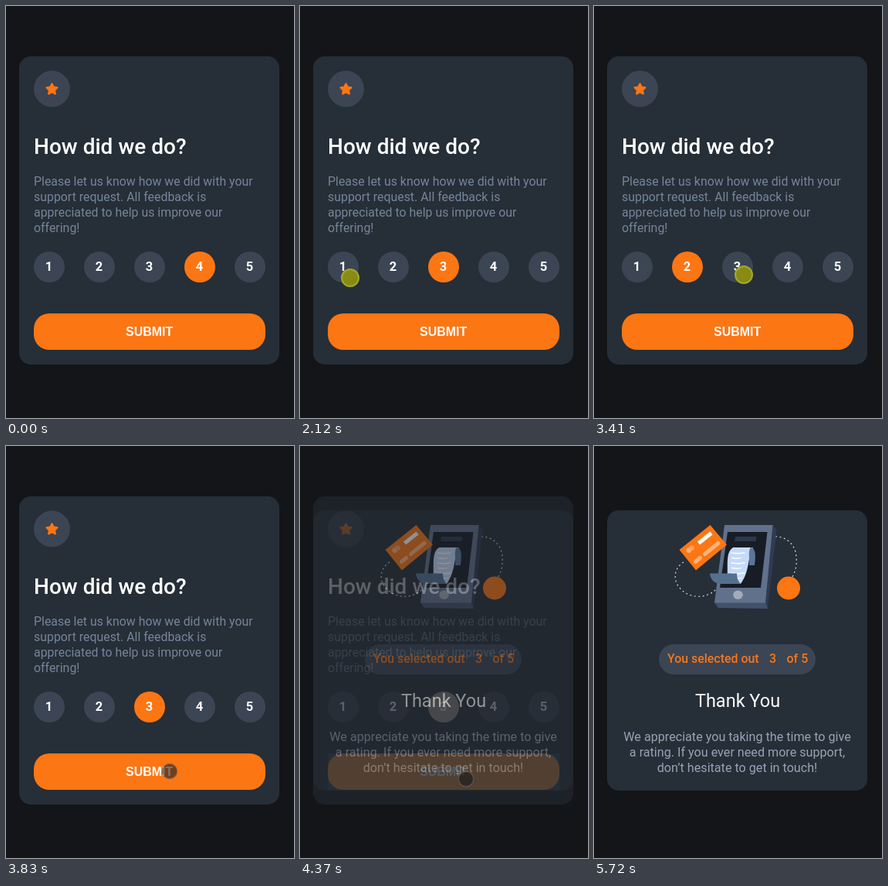
Recreate the animation shown at these times as an HTML page with a canvas. Size 373x532 px, loop 6.66 s.

```html
<!DOCTYPE html>
<html lang="en">
<head>
<meta charset="utf-8">
<title>Rating card</title>
<style>
  html, body { margin: 0; width: 100%; height: 100%; overflow: hidden; background: #131518; }
  canvas { display: block; width: 373px; height: 532px; }
</style>
</head>
<body>
<canvas id="stage" width="373" height="532"></canvas>
<script>
const W = 373, H = 532, LOOP = 6660, STEP = 69;
const BG = '#131518', CARD = '#262e37', SLATE = '#3b4554', ORANGE = '#fc7614';
const SANS = 'Roboto, "Open Sans", sans-serif';
const screen = document.getElementById('stage').getContext('2d');

const layer = () => {
  const c = document.createElement('canvas');
  c.width = W;
  c.height = H;
  return c.getContext('2d');
};
const form = layer(), thanks = layer();

const clamp = v => Math.max(0, Math.min(1, v));
const easeOut = u => 1 - (1 - u) * (1 - u);
const easeBoth = u => u * u * (3 - 2 * u);

function box(g, x, y, w, h, r, color) {
  g.fillStyle = color;
  g.beginPath();
  g.roundRect(x, y, w, h, r);
  g.fill();
}

function disc(g, x, y, r, color, ry = r) {
  g.fillStyle = color;
  g.beginPath();
  g.ellipse(x, y, r, ry, 0, 0, Math.PI * 2);
  g.fill();
}

function shape(g, color, d) {
  g.fillStyle = color;
  g.fill(new Path2D(d));
}

function line(g, color, width, d, cap = 'round') {
  g.strokeStyle = color;
  g.lineWidth = width;
  g.lineCap = cap;
  g.stroke(new Path2D(d));
}

function text(g, str, x, y, font, color, align = 'left') {
  g.font = font;
  g.fillStyle = color;
  g.textAlign = align;
  g.fillText(str, x, y);
}

function star(g, x, y, r) {
  g.beginPath();
  for (let i = 0; i < 10; i++) {
    const a = -Math.PI / 2 + i * Math.PI / 5, d = i % 2 ? r * 0.52 : r;
    g.lineTo(x + d * Math.cos(a), y + d * Math.sin(a));
  }
  g.closePath();
  g.fillStyle = g.strokeStyle = ORANGE;
  g.lineJoin = 'round';
  g.lineWidth = 2;
  g.fill();
  g.stroke();
}

const buttonX = n => 56 + 65 * (n - 1);

function drawForm(g, rating, active) {
  g.clearRect(0, 0, W, H);
  box(g, 17, 65, 337, 398, 15, CARD);
  disc(g, 59.5, 107, 23.5, SLATE);
  star(g, 59.5, 107.6, 7.4);
  text(g, 'How did we do?', 36, 191, `500 28px ${SANS}`, '#fff');
  ['Please let us know how we did with your', 'support request. All feedback is',
    'appreciated to help us improve our', 'offering!']
    .forEach((s, i) => text(g, s, 36, 231.5 + 20 * i, `15.9px ${SANS}`, '#75859a'));
  for (let n = 1; n <= 5; n++) {
    disc(g, buttonX(n), 337, 20, n === rating ? active : SLATE);
    text(g, n, buttonX(n) - 0.5, 341.5, `bold 16.5px ${SANS}`, '#fff', 'center');
  }
  box(g, 36, 397, 300, 47, 20, ORANGE);
  text(g, 'SUBMIT', 155, 426, 'bold 16px "Liberation Sans", Arial, sans-serif', '#fff');
}

function drawPicture(g) {
  g.setLineDash([2, 3.5]);
  line(g, '#e4e8ee', 1.1, 'M116 150C104 157 102 172 110 182C122 198 147 198 159 184', 'butt');
  line(g, '#e4e8ee', 1.1, 'M235 117C250 117 261 128 262 143C263 154 261 161 257 169', 'butt');
  g.setLineDash([]);

  // phone
  shape(g, '#2f3b51', 'M231 102L236.5 108L225 210L161 209L156 202Z');
  shape(g, '#42506a', 'M156 202L161 209L225 210L222 202Z');
  shape(g, '#61718c', 'M169 102H231.5L222 202.5H156Z');
  shape(g, '#171c25', 'M173 111H224.5L216 183H163Z');
  shape(g, '#2d384c', 'M183 117H210.5L209.5 123H182Z');
  disc(g, 186.5, 192.3, 6.3, '#a3abb8', 5.7);

  // receipt
  shape(g, '#c5dafa', 'M180 131H206C199 139 203 160 190 178H171C176 161 168 139 180 131Z');
  shape(g, '#5b7698', 'M203 131C211 132 209 146 208 154H201C202 145 199 136 203 131Z');
  for (let i = 0; i < 6; i++) {
    const y = 138 + i * 6.5;
    line(g, '#fff', 1.3, `M${178 + i % 2} ${y}q8 1.5 ${i % 2 ? 12 : 17} 0`);
  }
  shape(g, '#55708f', 'M150 164.5H185C185 171 187 175 190 178H163C155 177 151 172 150 164.5Z');

  // payment card
  shape(g, ORANGE, 'M110.5 134L150.5 102L172 127.5L132 160.5Z');
  line(g, '#fff', 5, 'M135.5 125.5L152 112.5', 'butt');
  line(g, '#ffb27a', 5, 'M143.5 139.5L161 125.5');
  line(g, '#ffb27a', 5, 'M131.5 149.5L137.5 144.5');
  disc(g, 122.8, 134.7, 3.3, '#ffb27a');
  disc(g, 126.6, 131.8, 3.3, '#ffa05c');

  disc(g, 252, 183.5, 15, ORANGE);
}

function drawThanks(g) {
  box(g, 17, 83, 337, 362, 15, CARD);
  drawPicture(g);
  box(g, 84, 256, 203, 39, 19.5, SLATE);
  const font = `500 15.9px ${SANS}`;
  text(g, 'You selected out', 95, 280, font, ORANGE);
  text(g, '3', 231.5, 280, font, ORANGE, 'center');
  text(g, 'of 5', 249.5, 280, font, ORANGE);
  text(g, 'Thank You', 186, 337, `23.5px ${SANS}`, '#fff', 'center');
  ['We appreciate you taking the time to give', 'a rating. If you ever need more support,',
    'don’t hesitate to get in touch!']
    .forEach((s, i) => text(g, s, 185.5, 380.5 + 20 * i, `16.15px ${SANS}`, '#97a3b5', 'center'));
}

// [start, steps, from x, y, to x, y, easing]
const moves = [
  [680, 9, 339, 528, 189, 341, easeOut],
  [1440, 8, 189, 341, 66, 351, easeBoth],
  [2120, 1, 65, 351, 65, 351, easeBoth],
  [2320, 5, 65, 351, 142, 347, easeBoth],
  [2990, 6, 142, 347, 194, 347, easeBoth],
  [3550, 4, 194, 347, 212, 420, easeBoth],
  [3830, 3, 212, 420, 215, 430, easeOut],
  [5310, 5, 220, 434, 329, 526, u => u]
];
const ratings = [[0, 4], [1440, 3], [2320, 1], [2990, 2], [3550, 3]];
const presses = [[1300, 1370], [2120, 2250], [2790, 2920], [3410, 3480], [4100, 4230]];
const taps = [[1370, 3], [2250, 1], [2920, 2], [3480, 3]];

const latest = (list, t) => list.filter(item => item[0] <= t).pop();

function drawPointer(g, t) {
  if (t < 680 || t >= 5715 || (t >= 1160 && t < 1230)) return;
  const [start, steps, x0, y0, x1, y1, ease] = latest(moves, t);
  const u = ease(clamp(Math.floor((t - start) / STEP) / steps));
  const x = x0 + (x1 - x0) * u, y = y0 + (y1 - y0) * u;
  const pressed = presses.some(([a, b]) => t >= a && t < b);
  disc(g, x, y, pressed ? 11 : 10, pressed ? 'rgba(143,146,14,.92)' : 'rgba(22,23,24,.58)');
  g.strokeStyle = pressed ? '#a3a62a' : 'rgba(130,130,125,.4)';
  g.lineWidth = pressed ? 2.2 : 1.5;
  g.beginPath();
  g.arc(x, y, pressed ? 10.9 : 9.7, 0, Math.PI * 2);
  g.stroke();
}

function tapGlow(g, x, y, w, h, alpha) {
  g.fillStyle = `rgba(51,181,229,${alpha})`;
  g.fillRect(x, y, w, h);
}

function render(t) {
  const g = screen;
  g.globalAlpha = 1;
  g.fillStyle = BG;
  g.fillRect(0, 0, W, H);

  const fade = t < 4230 ? 0 : clamp((Math.floor((t - 4230) / STEP) * STEP - 35) / 315);
  const shown = t >= 4580 ? 1 : 1 - Math.pow(1 - fade, 1.75);
  if (shown < 1) {
    drawForm(form, latest(ratings, t)[1], t >= 4300 ? '#a8a09a' : ORANGE);
    const tap = taps.find(([a]) => t >= a && t < a + 70);
    if (tap) tapGlow(form, buttonX(tap[1]) - 20, 317, 40, 40, 0.4);
    if (t >= 4230) tapGlow(form, 36, 397, 300, 47, 0.4 * (1 - shown));
    g.globalAlpha = 1 - shown * 0.9;
    g.drawImage(form.canvas, 0, 0);
  }
  if (shown > 0) {
    g.globalAlpha = shown;
    g.drawImage(thanks.canvas, 0, 0);
  }
  g.globalAlpha = 1;
  drawPointer(g, t);
}

drawThanks(thanks);
const begin = performance.now();
function tick() {
  render((performance.now() - begin) % LOOP);
  requestAnimationFrame(tick);
}
tick();
</script>
</body>
</html>
```
